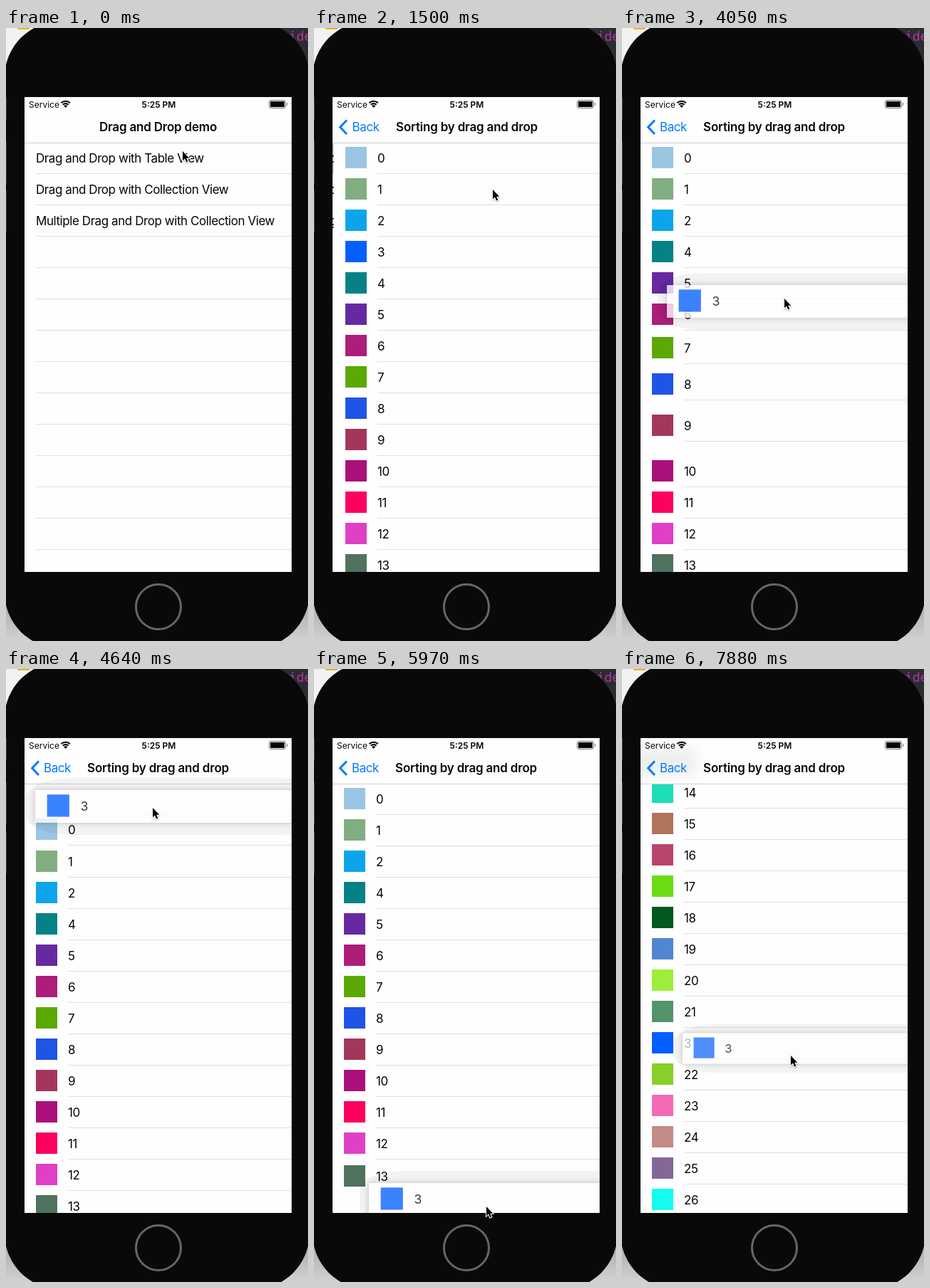
An HTML page with a canvas that plays this animation: 424 px wide and 861 px high, repeating every 8000 ms.

```html
<!DOCTYPE html>
<html lang="en">
<head>
<meta charset="utf-8">
<title>Drag and Drop demo</title>
<style>
html, body { margin: 0; width: 100%; height: 100%; overflow: hidden; background: #0a0a0a; }
canvas { display: block; }
</style>
</head>
<body>
<canvas id="stage" width="424" height="861"></canvas>
<script>
const ctx = document.getElementById('stage').getContext('2d');
const LOOP = 8000, ROW = 44, FIRST = 183;
const PAPER = '#fefefe', BLUE = '#007aff', LINE = '#dfdfe1', INK = '#050505';
const screen = { x: 26, y: 97, w: 375, h: 667 };
const NAV_BOTTOM = 161, PUSH = 1100, LIFT = 2850, DRAG = 3300, DROP = 7800, HELD = 3;

const colors = ('9ac6e4 80ae80 0ca5ec 055fff 068286 6629a2 ad1d7a 5ca804 1f55e6 a4365c ' +
  'ab0f7b fb025f e040c6 4f735e 1cdeb8 b0745a b9456c 6cdc16 01591d 5386d2 9cee3b 54946a ' +
  '88cf29 f26ab5 c38a88 826898 14fcee').split(' ').map(c => '#' + c);
const others = colors.map((_, n) => n).filter(n => n !== HELD);
const menu = ['Drag and Drop with Table View', 'Drag and Drop with Collection View',
  'Multiple Drag and Drop with Collection View'];

// Key poses: time, x, y; eased in between
const cursorPath = [
  [1200, 248, 173], [1500, 251, 227], [1950, 192, 241], [2250, 178, 341], [2550, 181, 317],
  [DRAG, 181, 317], [3850, 250, 565], [4250, 206, 195], [4900, 206, 195],
  [5635, 242, 755], [6750, 242, 755], [7600, 237, 543]];
const dragPath = [
  [DRAG, 181, 315], [3850, 246, 575], [4250, 202, 193], [4900, 202, 193],
  [5757, 238, 745], [6750, 238, 745], [7600, 235, 533]];

function smooth(v) {
  v = Math.max(0, Math.min(1, v));
  return v * v * (3 - 2 * v);
}

function poseAt(path, t) {
  let [, x, y] = path[0];
  for (let i = 1; i < path.length; i++) {
    const [from] = path[i - 1], [to, toX, toY] = path[i];
    const p = smooth((t - from) / (to - from));
    x += (toX - x) * p;
    y += (toY - y) * p;
  }
  return { x, y };
}

const scrollAt = t => Math.round(581 * smooth((t - 6120) / 857));

function tick(t) {
  return t < 4790 ? Math.floor(t / 150) * 150
    : 4790 + 146.6 * Math.floor((t - 4790) / 146.6);
}

// The gap follows the dragged row, and waits while the list scrolls fast
function findGapMoves() {
  const moves = [];
  let gap = HELD;
  for (let t = DRAG; t < DROP; t += 5) {
    if (scrollAt(t) - scrollAt(t - 40) > 35) continue;
    const y = poseAt(dragPath, t).y + scrollAt(t) - FIRST;
    const next = Math.max(0, Math.round(y / ROW));
    if (next !== gap) moves.push({ time: t + 15, gap: gap = next });
  }
  return moves;
}
const gapMoves = findGapMoves();

function gapAt(t) {
  return gapMoves.reduce((gap, move) => move.time <= t ? move.gap : gap, HELD);
}

function slotOf(i, t) {
  let shift = i >= HELD ? 1 : 0;
  for (const { time, gap } of gapMoves) {
    shift += ((i >= gap ? 1 : 0) - shift) * smooth((t - time) / 300);
  }
  return i + shift;
}

function rect(x, y, w, h, fill) {
  ctx.fillStyle = fill;
  ctx.fillRect(x, y, w, h);
}

function text(str, x, y, { size = 17, weight = 400, color = INK, align = 'left', spacing = 0 } = {}) {
  ctx.font = `${weight} ${size}px Inter, sans-serif`;
  ctx.letterSpacing = `${spacing}px`;
  ctx.textAlign = align;
  ctx.fillStyle = color;
  ctx.fillText(str, x, y);
}

function withAlpha(alpha, draw) {
  ctx.save();
  ctx.globalAlpha *= alpha;
  draw();
  ctx.restore();
}

function clipTo(x, y, w, h, draw) {
  ctx.save();
  ctx.beginPath();
  ctx.rect(x, y, w, h);
  ctx.clip();
  draw();
  ctx.restore();
}

function drawPhone() {
  rect(0, 0, 212, 430, '#f2f2f2');
  rect(16, 0, 17, 2, '#e0b820');
  rect(212, 0, 212, 430, '#2b2b31');
  const shade = ctx.createLinearGradient(0, 810, 0, 861);
  shade.addColorStop(0, '#adadad');
  shade.addColorStop(1, '#d2d2d2');
  rect(0, 430, 424, 431, shade);
  ctx.font = '18px "Noto Sans Mono", monospace';
  ctx.letterSpacing = '0px';
  ctx.textAlign = 'left';
  ctx.fillStyle = '#b0389c';
  ctx.fillText('ide', 397, 18);
  ctx.fillStyle = '#090909';
  ctx.beginPath();
  ctx.roundRect(-2, -9, 428, 880, 78);
  ctx.fill();
  for (const [y, h] of [[97, 32], [159, 59], [228, 59]]) rect(0, y, 1, h, '#3c3c3c');
  ctx.strokeStyle = '#666';
  ctx.lineWidth = 3;
  ctx.beginPath();
  ctx.arc(214, 813, 31.5, 0, Math.PI * 2);
  ctx.stroke();
}

function drawStatus() {
  text('Service', 32, 111.5, { size: 12 });
  text('5:25 PM', 214.5, 111.5, { size: 12, weight: 600, align: 'center' });
  ctx.strokeStyle = ctx.fillStyle = INK;
  ctx.lineWidth = 2.1;
  for (const r of [5.4, 8.7]) {
    ctx.beginPath();
    ctx.arc(83.7, 111.5, r, -Math.PI * .75, -Math.PI * .25);
    ctx.stroke();
  }
  ctx.beginPath();
  ctx.moveTo(83.7, 112);
  ctx.arc(83.7, 112, 3.6, -Math.PI * .75, -Math.PI * .25);
  ctx.fill();
  ctx.strokeStyle = '#777';
  ctx.lineWidth = 1;
  ctx.beginPath();
  ctx.roundRect(369.5, 101.5, 23, 11, 2.5);
  ctx.stroke();
  rect(371, 103, 20, 8, INK);
  rect(394, 105, 1, 4, '#777');
}

// Rows under the bar shine through as a faint blur
function drawNavTint(t, scroll) {
  clipTo(screen.x, screen.y, screen.w, NAV_BOTTOM - screen.y, () => {
    ctx.globalAlpha = .1;
    ctx.filter = 'blur(9px)';
    others.forEach((n, i) => {
      const y = FIRST + ROW * slotOf(i, t) - scroll;
      if (y > 90 && y < NAV_BOTTOM) rect(16, y - 20, 88, 40, colors[n]);
    });
  });
}

function drawNav(t, push, scroll) {
  rect(screen.x, screen.y, screen.w, NAV_BOTTOM - screen.y, PAPER);
  if (scroll > 0) drawNavTint(t, scroll);
  rect(screen.x, NAV_BOTTOM, screen.w, 1, '#cfcfd1');
  drawStatus();
  const title = { weight: 600, align: 'center', spacing: -.2 };
  if (push < 1) {
    withAlpha(Math.max(0, 1 - push * 1.4),
      () => text('Drag and Drop demo', 213.5 - 140 * push, 145, title));
  }
  if (push > 0) {
    withAlpha(push, () => {
      text('Sorting by drag and drop', 213.5 + 170 * (1 - push), 145, title);
      text('Back', 53 + 100 * (1 - push), 145, { color: BLUE, spacing: -.43 });
      ctx.strokeStyle = BLUE;
      ctx.lineWidth = 3;
      ctx.beginPath();
      ctx.moveTo(46, 129.5);
      ctx.lineTo(36.7, 139.2);
      ctx.lineTo(46, 149);
      ctx.stroke();
    });
  }
}

function drawMenu(dx, pressed) {
  if (pressed) rect(screen.x + dx, NAV_BOTTOM, screen.w, ROW, '#d9d9d9');
  for (let i = 0; i < 14; i++) {
    const y = FIRST + ROW * i;
    if (menu[i]) text(menu[i], 42 + dx, y + 6, { spacing: -.43 });
    rect(42 + dx, y + 21, 359, 1, LINE);
  }
}

function drawContent(n, left, y) {
  rect(left + 16, y - 16, 30, 30, colors[n]);
  text(String(n), left + 61, y + 6, { spacing: -.43 });
}

function drawList(t, dx, scroll) {
  const left = screen.x + dx;
  rect(left, NAV_BOTTOM, screen.w, 604, PAPER);
  const place = slot => Math.round(FIRST + ROW * slot - scroll);
  const underline = y => rect(left + 61, y + 21, 314, 1, LINE);
  const gapY = place(gapAt(t));
  underline(gapY);
  others.forEach((n, i) => {
    const y = place(slotOf(i, t));
    drawContent(n, left, y);
    underline(y);
  });
  if (t < LIFT || t >= DROP) drawContent(HELD, left, gapY);
}

function drawDragged(t) {
  const { x, y: centre } = poseAt(dragPath, t);
  const dropping = t >= DROP;
  const scale = dropping ? .97 : 1 + .04 * smooth((t - LIFT + 60) / 350);
  const alpha = dropping ? .7 : 1 - .22 * smooth((t - DRAG) / 120);
  const left = Math.round(x - 155 * scale), y = Math.round(centre);
  const w = screen.w * scale, h = ROW * scale, top = y - h / 2;
  const pad = dropping ? 13 : 17;

  // Shadow stays outside the cell
  ctx.save();
  ctx.beginPath();
  ctx.rect(0, 0, 424, 861);
  ctx.rect(left, top, w, h);
  ctx.clip('evenodd');
  ctx.fillStyle = 'rgba(0,0,0,.045)';
  ctx.beginPath();
  ctx.roundRect(left - 13, top - pad, w + 26, h + pad * 2, { x: 60, y: 28 });
  ctx.fill();
  ctx.shadowColor = 'rgba(0,0,0,.22)';
  ctx.shadowBlur = 8;
  rect(left, top, w, h, PAPER);
  ctx.restore();

  withAlpha(alpha, () => {
    ctx.translate(left, y);
    ctx.scale(scale, scale);
    rect(0, -ROW / 2, screen.w, ROW, PAPER);
    drawContent(HELD, 0, 0);
  });
}

function drawCursor(t) {
  const { x, y } = poseAt(cursorPath, t);
  ctx.save();
  ctx.translate(Math.round(x), Math.round(y));
  ctx.beginPath();
  [[0, 0], [0, 13.2], [3, 10.5], [5.2, 15.6], [7.4, 14.6], [5.2, 9.7], [9.2, 9.7]]
    .forEach(p => ctx.lineTo(...p));
  ctx.closePath();
  ctx.shadowColor = 'rgba(0,0,0,.3)';
  ctx.shadowBlur = 2;
  ctx.shadowOffsetY = 1;
  ctx.strokeStyle = '#fff';
  ctx.lineWidth = 2;
  ctx.stroke();
  ctx.shadowColor = 'transparent';
  ctx.fillStyle = '#000';
  ctx.fill();
  ctx.restore();
}

// Critically damped spring
function pushAt(t) {
  if (t >= 1650) return 1;
  const s = Math.max(0, t - PUSH) * .018;
  return 1 - (1 + s) * Math.exp(-s);
}

function render(time) {
  const t = tick(time);
  const push = pushAt(t), scroll = scrollAt(t);

  drawPhone();
  clipTo(screen.x, screen.y, screen.w, screen.h, () => {
    rect(screen.x, screen.y, screen.w, screen.h, PAPER);
    if (push < 1) {
      drawMenu(-112 * push, t >= 1050);
      rect(screen.x, NAV_BOTTOM, screen.w, 604, `rgba(0,0,0,${.06 * push})`);
    }
    if (push > 0) drawList(t, Math.round(screen.w * (1 - push)), scroll);
    drawNav(t, push, scroll);
    if (t >= LIFT) drawDragged(t);
  });
  drawCursor(t);
}

const start = performance.now();
function loop() {
  render((performance.now() - start) % LOOP);
  requestAnimationFrame(loop);
}
loop();
</script>
</body>
</html>
```
